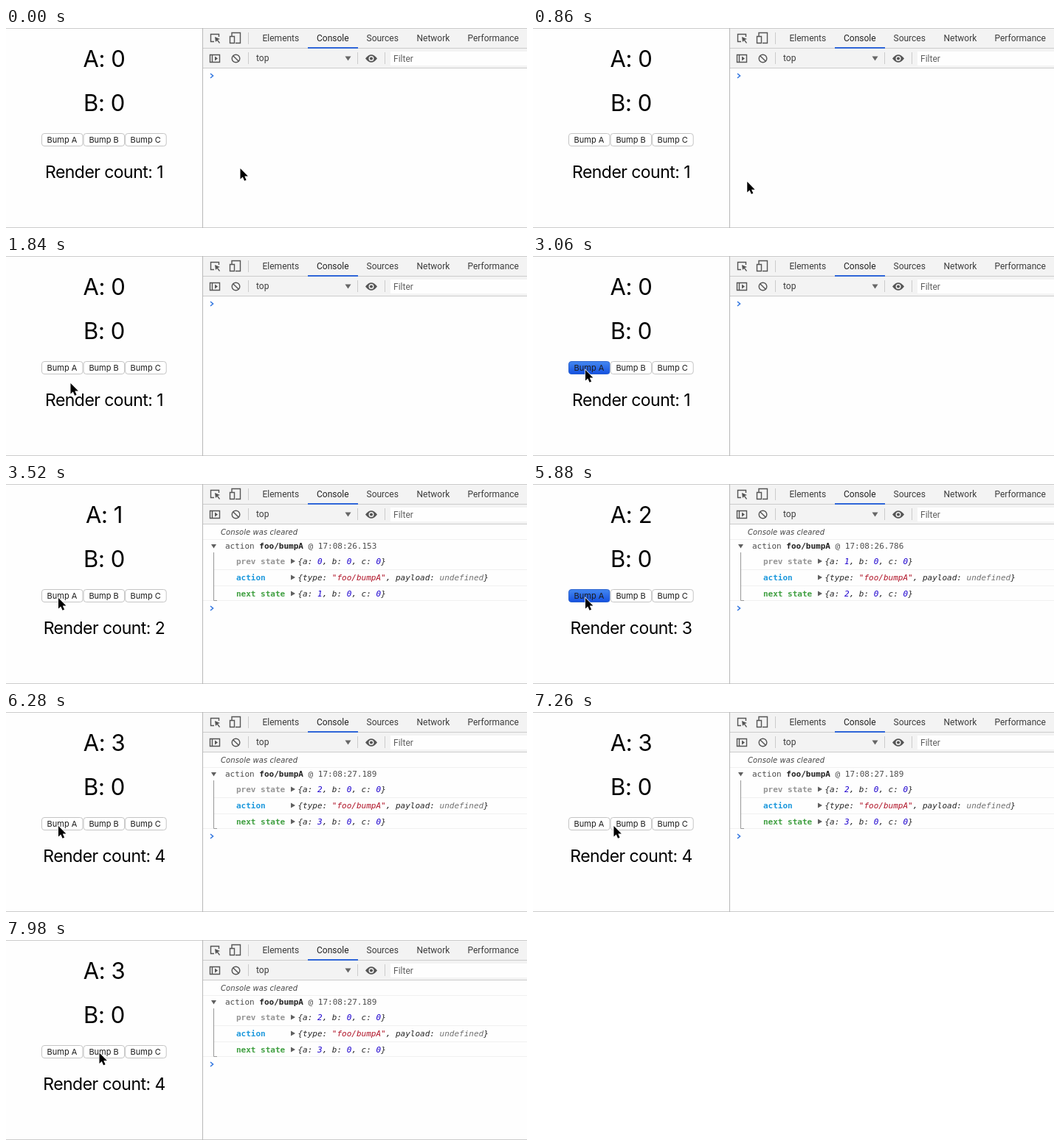
Write an HTML page that moves like this. It is 706 by 272 pixels and loops after 8 s.

```html
<!DOCTYPE html>
<html lang="en">
<head>
<meta charset="utf-8">
<title>Render counter and console</title>
<style>
html, body { margin: 0; width: 706px; height: 272px; overflow: hidden; background: #fefefe; }
svg { display: block; }
text { white-space: pre; }
.big { font: 31px Inter, sans-serif; letter-spacing: -.4px; text-anchor: middle; }
.mid { font: 23px Inter, sans-serif; letter-spacing: -.55px; text-anchor: middle; }
.btn { font: 11px Inter, sans-serif; text-anchor: middle; fill: #1c1c1c; }
.ui { font: 12px Roboto, sans-serif; fill: #3c3c3c; }
.note { font: italic 10px "DejaVu Sans", sans-serif; letter-spacing: .08px; fill: #444; }
.mono { font: 11px "DejaVu Sans Mono", monospace; fill: #4c4c4c; }
.mono .b { font-weight: bold; }
.obj { font-style: italic; fill: #262626; }
.num { fill: #1c00cf; }
.str { fill: #b01428; }
.undef { fill: #707070; }
.icon { fill: none; stroke: #555; stroke-width: 1.4; }
.sep { stroke: #ccc; }
.row { stroke: #f0f0f0; }
</style>
</head>
<body>
<svg width="706" height="272" viewBox="0 0 706 272">
  <defs>
    <linearGradient id="blue" x2="0" y2="1">
      <stop stop-color="#4488f0"/><stop offset="1" stop-color="#1450e0"/>
    </linearGradient>
  </defs>

  <text id="a" class="big" x="133" y="53"></text>
  <text class="big" x="133" y="113">B: 0</text>
  <g id="buttons"></g>
  <text id="renders" class="mid" x="133" y="204"></text>

  <!-- toolbars -->
  <path fill="#f3f3f3" d="M267 0H706V54H267z"/>
  <path stroke="#ccc" d="M267 27.5H706M267 54.5H706M0 .5H706M0 271.5H706"/>
  <path stroke="#b8b8b8" d="M266.5 0V272"/>
  <path class="sep" d="M328.5 6V22M328.5 33V49M476.5 33V49M513.5 33V49"/>
  <path fill="#fefefe" d="M521 32H706V51H521z"/>
  <path fill="#2f66d8" d="M409 26H477V28H409z"/>
  <g id="tabs" class="ui"></g>
  <text class="ui" x="339" y="45">top</text>
  <text class="ui" x="525" y="46" style="fill:#606060">Filter</text>
  <g class="icon">
    <path d="M282 18.500H277.500V8.500H288.500V12"/>
    <path d="M283 12l7 3-3 1 3 4-1 1-3-4-2 2z" fill="#555" stroke="none"/>
    <path d="M306 11V6.500H317.500V20.500H311M303.500 11.500H309.500V20.500H303.500z"/>
    <path d="M276.500 36.500H289.500V46.500H276.500zM279.500 36V47"/>
    <path d="M283 38.500l4 3-4 3z" fill="#555" stroke="none"/>
    <circle cx="311.500" cy="41.500" r="5.300"/>
    <path d="M307.700 37.700l7.600 7.600"/>
    <path d="M487 41.500Q495 31 503 41.500Q495 52 487 41.500z" fill="#555" stroke="none"/>
    <circle cx="495" cy="41.500" r="2.800" fill="#555" stroke="#f3f3f3"/>
  </g>
  <path fill="#666" d="M459.500 38.500h8l-4 6z"/>

  <g id="log">
    <path class="row" d="M267 75.500H706M282 116.500H706M282 138.500H706M267 158.500H706"/>
    <text class="note" x="291" y="69">Console was cleared</text>
    <path fill="#606060" d="M278 82h7l-3.500 5.500z"/>
    <text class="mono" x="297" y="88">action <tspan class="b" fill="#202020">foo/bumpA</tspan> @ 17:08:<tspan id="stamp"></tspan></text>
    <path fill="none" stroke="#989898" d="M281.500 93V158.500H286"/>
    <g id="entries" class="mono"></g>
  </g>
  <path id="prompt" d="M277 62l3.500 3-3.500 3" fill="none" stroke="#3578e0" stroke-width="1.600"/>

  <path id="cursor" d="M.5 1v14.500l3.300-3 2.300 5.300 2.500-1-2.300-5.200h4.600z" stroke="#fff" stroke-width="1.400" paint-order="stroke"/>
</svg>
<script>
const LOOP = 8000, HOLD = 280;
const presses = [3060, 4740, 5760];
const stamps = ["", "26.153", "26.786", "27.189"];
const $ = id => document.getElementById(id);

const linear = u => u;
const easeIn = u => u * u;
const easeOut = u => u * (2 - u);
const smooth = u => u * u * (3 - 2 * u);

// time, tip x, tip y, easing towards this point
const path = [
  [280, 317, 190], [860, 290, 208, easeIn], [1000, 254, 218, linear],
  [1100, 252, 218, linear], [1840, 87, 172, easeOut], [1940, 87, 172, linear],
  [2260, 73, 155, easeOut], [2400, 73, 155, linear], [2500, 70.5, 154, linear],
  [6720, 70.5, 154, linear], [7440, 116, 154, smooth],
  [7540, 117, 154, linear], [7980, 126, 152.500, easeOut]
];

$("buttons").innerHTML = ["A", "B", "C"].map((name, i) => {
  const x = 48.5 + i * 56.6;
  return `<rect id="btn${name}" x="${x}" y="143.500" width="55.500" height="17" rx="3.500" fill="#fff" stroke="#c4c4c4"/>
    <text class="btn" x="${x + 27.5}" y="156">Bump ${name}</text>`;
}).join("");

$("tabs").innerHTML = Object.entries({ Elements: 347.5, Console: 421, Sources: 488.5, Network: 556.5, Performance: 625.5 })
  .map(([name, x]) => `<text x="${x}" y="18"${name === "Console" ? ' style="fill:#222"' : ""}>${name}</text>`).join("");

const num = (n, id = "") => `<tspan class="num" id="${id}">${n}</tspan>`;
const state = id => `{a: ${num(0, id)}, b: ${num(0)}, c: ${num(0)}}`;
const entry = (y, color, label, value) => `
  <text class="b" x="312" y="${y}" style="fill:${color}">${label}</text>
  <path fill="#606060" d="M386 ${y - 7.5}v7l6-3.500z"/>
  <text class="obj" x="395.500" y="${y}">${value}</text>`;
$("entries").innerHTML =
  entry(109, "#949494", "prev state", state("prev")) +
  entry(131, "#1c98dc", "action", '{type: <tspan class="str">"foo/bumpA"</tspan>, payload: <tspan class="undef">undefined</tspan>}') +
  entry(153, "#3f9f40", "next state", state("next"));

function cursorAt(t) {
  const i = path.findIndex(p => p[0] > t);
  if (i === 0) return path[0].slice(1, 3);
  if (i < 0) return path[path.length - 1].slice(1, 3);
  const [t0, x0, y0] = path[i - 1], [t1, x1, y1, ease] = path[i];
  const u = ease((t - t0) / (t1 - t0));
  return [x0 + (x1 - x0) * u, y0 + (y1 - y0) * u];
}

function draw(now) {
  const t = now % LOOP;
  const count = presses.filter(p => t >= p + HOLD).length;
  const down = presses.some(p => t >= p && t < p + HOLD);
  $("a").textContent = "A: " + count;
  $("renders").textContent = "Render count: " + (count + 1);
  $("btnA").setAttribute("fill", down ? "url(#blue)" : "#fff");
  $("btnA").setAttribute("stroke", down ? "#2a62d0" : "#c4c4c4");
  $("log").style.display = count ? "" : "none";
  $("stamp").textContent = stamps[count];
  $("prev").textContent = count - 1;
  $("next").textContent = count;
  $("prompt").setAttribute("transform", `translate(0 ${count ? 104 : 0})`);
  $("cursor").setAttribute("transform", `translate(${cursorAt(t)})`);
}

const start = performance.now();
function tick() {
  draw(performance.now() - start);
  requestAnimationFrame(tick);
}
tick();
</script>
</body>
</html>
```
